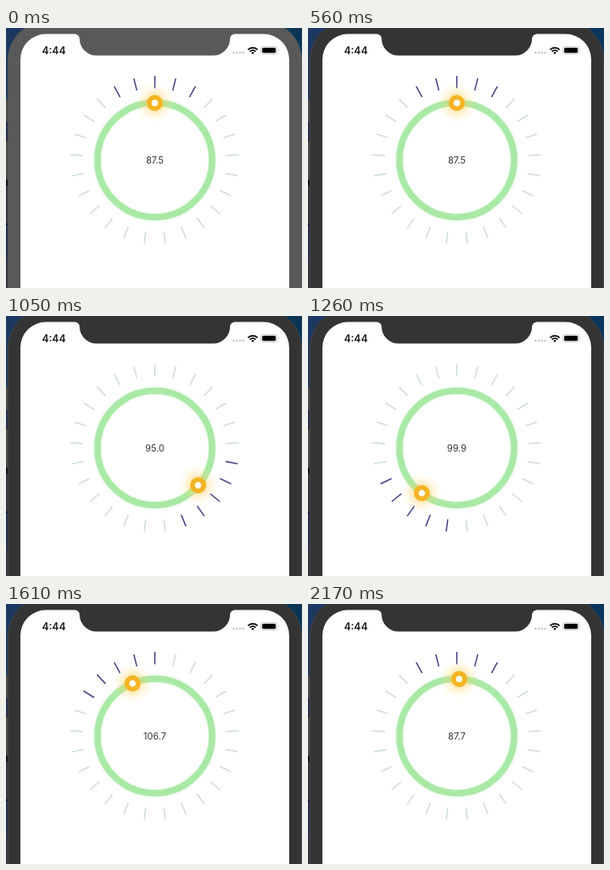
An HTML page that plays this animation: 370x326 px, repeating every 2660 ms.

```html
<!DOCTYPE html>
<html lang="en">
<head>
<meta charset="utf-8">
<title>Radio dial</title>
<style>
  html, body { margin: 0; width: 100%; height: 100%; overflow: hidden; }
  svg { display: block; width: 370px; height: 326px; }
  text { font-family: Inter, sans-serif; }
  .clock { font-size: 12.8px; font-weight: 600; fill: #1a1a1a; }
  .value { font-size: 11.5px; fill: #333; text-anchor: middle; }
  .ring { fill: none; stroke: #a9e9a6; stroke-width: 8; filter: blur(.4px) drop-shadow(0 0 1.5px #a9e9a688); }
  .tick { stroke: #cfdcdd; stroke-width: 1.6; }
  .tick.on { stroke: #434388; }
</style>
</head>
<body>
<svg viewBox="0 0 370 326">
  <defs>
    <linearGradient id="sky">
      <stop offset="0" stop-color="#1d3860"/>
      <stop offset="1" stop-color="#0b3658"/>
    </linearGradient>
    <radialGradient id="glow">
      <stop offset=".36" stop-color="#ffc845" stop-opacity=".45"/>
      <stop offset=".65" stop-color="#ffd56a" stop-opacity=".2"/>
      <stop offset="1" stop-color="#ffe08a" stop-opacity="0"/>
    </radialGradient>
  </defs>

  <!-- desktop behind the phone -->
  <rect width="370" height="326" fill="url(#sky)"/>
  <path d="M0 90h4v28H0zM0 142h4v48H0z" fill="#4a4a4a"/>
  <path d="M0 118h4v24H0zM0 246h4v46H0z" fill="#232c4c"/>
  <path d="M0 190h4v8H0zM0 245h4v2H0z" fill="#0c0c10"/>
  <path d="M0 198h4v47H0zM0 292h4v34H0z" fill="#30353f"/>

  <!-- phone -->
  <rect x="2.5" y="-8" width="367" height="400" rx="48" fill="#343434" stroke="#464646"/>
  <rect id="veil" x="2.5" y="-8" width="367" height="400" rx="48" fill="#fff"/>
  <path fill="#fff" transform="translate(0 -.5)" d="M18 327V40A32 32 0 0 1 50 8H86A6 6 0 0 1 92 14A21 21 0 0 0 113 35H259A21 21 0 0 0 280 14A6 6 0 0 1 286 8H322A32 32 0 0 1 354 40V327Z"/>

  <!-- status bar -->
  <text class="clock" x="45" y="32.8">4:44</text>
  <path d="M284.5 31h13" stroke="#ccc" stroke-width="2.8" stroke-linecap="round" stroke-dasharray="0 4"/>
  <g fill="none" stroke="#111" stroke-width="2">
    <path d="M302.6 27.2a8.4 8.4 0 0 1 11.8 0M304.9 29.6a5.1 5.1 0 0 1 7.2 0"/>
    <path d="M306.6 31l1.9 2 1.9-2a2.8 2.8 0 0 0-3.8 0z" fill="#111" stroke="none"/>
  </g>
  <rect x="318.7" y="23.2" width="20" height="9.5" rx="2.8" fill="none" stroke="#c8c8c8"/>
  <rect x="320.2" y="24.7" width="17" height="6.5" rx="1.5" fill="#000"/>
  <path d="M340.2 26.5q1.4 1.5 0 3z" fill="#aaa"/>

  <!-- dial -->
  <g transform="translate(186 165.5)">
    <g id="ticks"></g>
    <circle class="ring" r="71.7"/>
    <text class="value" id="value" y="4.7"></text>
    <g id="knob">
      <g transform="translate(0 -71.5)">
        <circle r="25" fill="url(#glow)"/>
        <circle r="7" fill="#fff" stroke="#f5b423" stroke-width="6"/>
      </g>
    </g>
  </g>
</svg>
<script>
const LOOP = 2660, STEP = 70;
const TICKS = 25, LOW = 87.5, SPAN = 20.5;

// time in ms, angle in degrees, speed in degrees per step
const path = [
  [560, 0, 0], [840, 51.3, 24], [1260, 217.7, 29],
  [1470, 300.7, 24], [1750, 355.6, 6], [1890, 362.4, 1]
];

const byId = id => document.getElementById(id);
const ticks = Array.from({ length: TICKS }, (_, i) => {
  const line = document.createElementNS('http://www.w3.org/2000/svg', 'line');
  line.setAttribute('y1', -90);
  line.setAttribute('y2', -105.5);
  line.setAttribute('transform', `rotate(${i * 360 / TICKS})`);
  return byId('ticks').appendChild(line);
});

function angleAt(t) {
  if (t <= path[0][0]) return 0;
  const next = path.findIndex(key => t < key[0]);
  if (next < 0) return path[path.length - 1][1];
  const [t0, a, va] = path[next - 1];
  const [t1, b, vb] = path[next];
  const u = (t - t0) / (t1 - t0), v = 1 - u, steps = (t1 - t0) / STEP;
  return v * v * (1 + 2 * u) * a + u * u * (1 + 2 * v) * b
    + steps * u * v * (v * va - u * vb);
}

function draw(now) {
  const t = Math.floor(now % LOOP / STEP) * STEP;
  const angle = angleAt(t) % 360;
  const nearest = Math.round(angle * TICKS / 360);
  const tenths = Math.ceil(10 * (LOW + SPAN * angle / 360));

  byId('veil').setAttribute('opacity', 0.18 * Math.max(0, 1 - t / (4 * STEP)));
  byId('knob').setAttribute('transform', `rotate(${angle})`);
  byId('value').textContent = (tenths / 10).toFixed(1);
  ticks.forEach((tick, i) => {
    const offset = (i - nearest + 2 + TICKS) % TICKS;
    tick.setAttribute('class', offset < 5 ? 'tick on' : 'tick');
  });
}

const start = performance.now();
function loop() {
  draw(performance.now() - start);
  requestAnimationFrame(loop);
}
loop();
</script>
</body>
</html>
```
